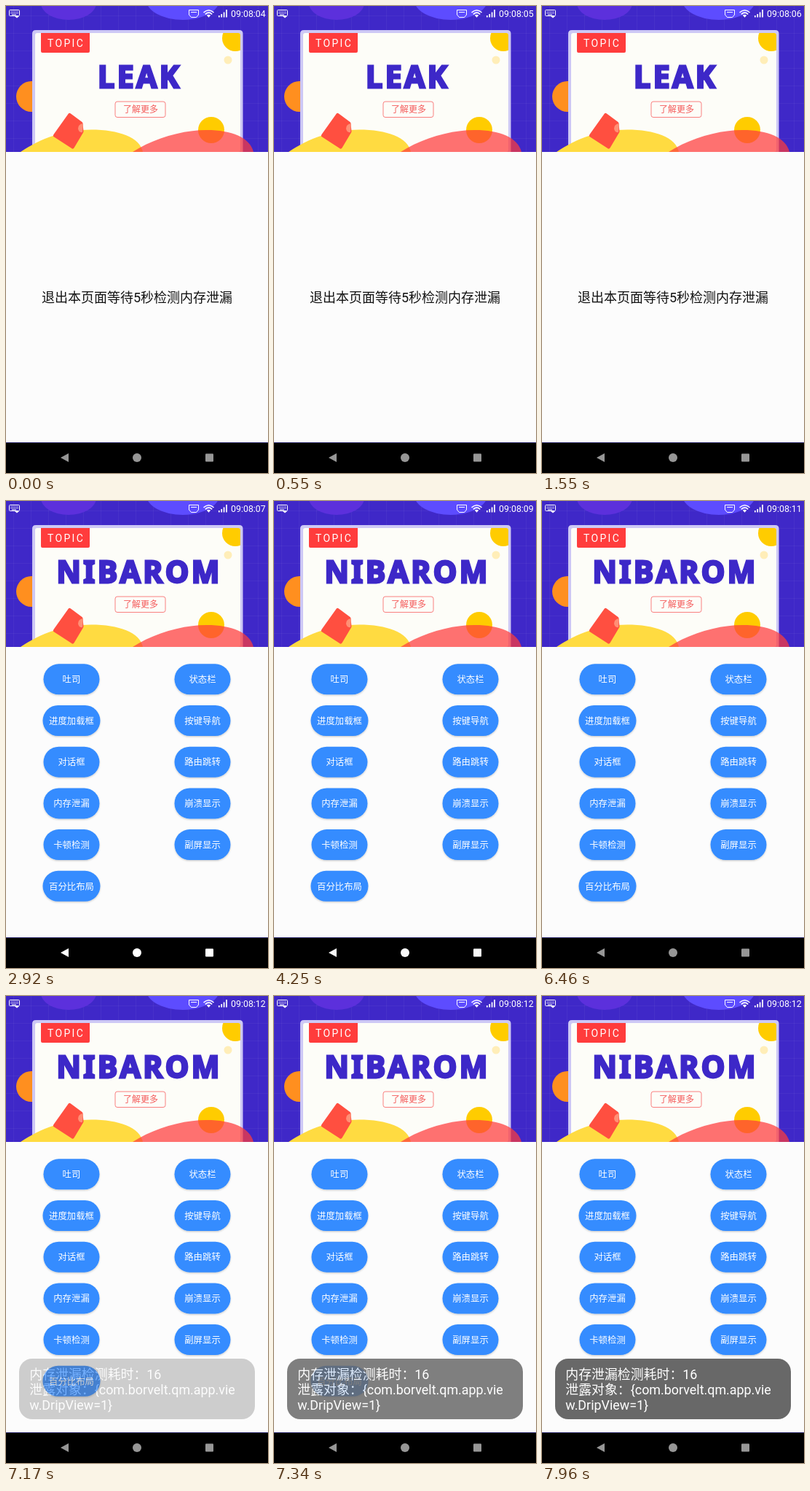
Animation of 360x640 px, one loop 8000 ms. Source, as an HTML page:

```html
<!DOCTYPE html>
<html lang="zh-CN">
<head>
<meta charset="utf-8">
<style>
  html, body { margin: 0; width: 100%; height: 100%; overflow: hidden; background: #000; }
  svg { display: block; width: 360px; height: 640px; font-family: Roboto, "Noto Sans CJK SC", "Noto Sans CJK", sans-serif; }
  .title { font: 700 41px "Noto Sans", sans-serif; letter-spacing: 3.4px; fill: #3d28c8; stroke: #3d28c8; stroke-width: 2.8; }
  .mid { text-anchor: middle; }
  .toast { font-size: 17.9px; fill: #fff; }
</style>
</head>
<body>
<svg viewBox="0 0 360 640">
  <defs>
    <pattern id="grid" x="10" y="13" width="24" height="24" patternUnits="userSpaceOnUse">
      <path d="M0 .5H24M.5 0V24" stroke="#fff" stroke-opacity=".045"/>
    </pattern>
    <clipPath id="card"><rect x="40" y="37" width="282" height="163" rx="3"/></clipPath>
    <filter id="shadow" x="-20%" y="-20%" width="140%" height="160%">
      <feDropShadow dx="0" dy="1.2" stdDeviation="1" flood-opacity=".2"/>
    </filter>
    <g id="banner">
      <path fill="#3f28c8" d="M0 0H360V200H0Z"/>
      <path fill="url(#grid)" d="M0 0H360V200H0Z"/>
      <ellipse cx="86" cy="-4" rx="38" ry="23" fill="#5c30dc"/>
      <ellipse cx="243" cy="-8" rx="50" ry="27" fill="#5d4cff"/>
      <circle cx="35" cy="124" r="21" fill="#ff8f1f"/>
      <path fill="#cdc8f5" d="M36 200V38Q36 33 41 33H320.500Q325.500 33 325.500 38V200Z"/>
      <g clip-path="url(#card)">
        <path fill="#fdfdf8" d="M40 37H322V200H40Z"/>
        <circle cx="315" cy="44" r="18" fill="#ffcc00"/>
      </g>
      <circle cx="305" cy="74" r="5.5" fill="#ffeeb8"/>
      <path fill="#ff3c3c" d="M48 37H115V62Q115 64 113 64H50Q48 64 48 62Z"/>
      <text x="57" y="56" font-size="14" letter-spacing="2.3" fill="#fff">TOPIC</text>
      <rect x="150" y="131" width="69" height="21.5" rx="3" fill="none" stroke="#f98080"/>
      <text class="mid" x="185" y="146" font-size="12" fill="#f45a5a">了解更多</text>
      <circle cx="282" cy="170" r="18" fill="#ffcc00"/>
      <path fill="#ffdb41" d="M20 200C48 181 80 169.500 117 169.500C155 169.500 184 180 188 200Z"/>
      <path fill="#ff3c3c" fill-opacity=".72" d="M174 200C202 182 240 170 276 170C310 170 335 180 340 200Z"/>
      <path fill="#ff4f40" stroke="#ff4f40" stroke-width="5" stroke-linejoin="round" d="M67.500 177.500L87.500 149.500L103 161L104 172L91.500 193Z"/>
      <path fill="#ff8f75" d="M106 161Q99 162 99 168Q100 174 105 173Z"/>
    </g>
  </defs>

  <g id="home">
    <path fill="#fcfcfc" d="M0 0H360V598H0Z"/>
    <use href="#banner"/>
    <text class="title mid" x="183.200" y="112">NIBAROM</text>
    <g id="buttons"></g>
  </g>

  <g id="leak">
    <path fill="#fcfcfc" d="M0 0H360V598H0Z"/>
    <use href="#banner"/>
    <text class="title mid" x="183.700" y="112">LEAK</text>
    <text class="mid" x="180" y="406" font-size="18" fill="#111">退出本页面等待5秒检测内存泄漏</text>
  </g>

  <g id="toast" class="toast">
    <rect x="18" y="497" width="324" height="83" rx="18" fill="#686868"/>
    <text x="32.300" y="525">内存泄漏检测耗时：16</text>
    <text x="32.300" y="546">泄露对象：{com.borvelt.qm.app.vie</text>
    <text x="32.300" y="567">w.DripView=1}</text>
  </g>

  <g fill="none" stroke="#fff">
    <rect x="4.500" y="5.500" width="14" height="8" rx="1"/>
    <path d="M6.500 8H17M6.500 10H17" stroke-dasharray="1.200 1"/>
    <path d="M8 12H14"/>
    <path d="M12 14H18L15 16.500Z" fill="#fff" stroke="none"/>
    <path d="M251.500 5.500H264.500V12L261.500 15.500H254.500L251.500 12ZM254 8.500H262"/>
    <path d="M271.500 9Q278.500 2.500 285.500 9M273.800 11.300Q278.500 7 283.200 11.300" stroke-width="1.600"/>
    <path d="M275.800 12.800Q278.500 10.500 281.200 12.800L278.500 15.800Z" fill="#fff" stroke="none"/>
    <path d="M292.800 15.500V13M296.200 15.500V11M299.600 15.500V8.500M303 15.500V5" stroke-width="1.700"/>
  </g>
  <text id="clock" x="309" y="15.300" font-size="12.400" fill="#fff"></text>

  <path d="M0 598H360V640H0Z"/>
  <path fill="#14105a" d="M0 598H360V599H0Z"/>
  <g id="nav">
    <path d="M75 619L86 613V625Z"/>
    <circle cx="180" cy="619" r="6"/>
    <rect x="274" y="613.500" width="11" height="11" rx="1"/>
  </g>
</svg>
<script>
const LOOP = 8000, CLOSE = 2100, DIM = 4200, TOAST = 7102;
const $ = id => document.getElementById(id);
const ramp = (t, start, length) => Math.min(1, Math.max(0, (t - start) / length));

const labels = ['吐司', '状态栏', '进度加载框', '按键导航', '对话框', '路由跳转',
  '内存泄漏', '崩溃显示', '卡顿检测', '副屏显示', '百分比布局'];
$('buttons').innerHTML = labels.map((label, i) => {
  const x = i % 2 ? 270 : 90, y = 244.3 + 56.7 * (i >> 1);
  const w = label.length > 4 ? 79 : 77;
  return `<rect x="${x - w / 2}" y="${y - 21}" width="${w}" height="42" rx="21" fill="#348cff" filter="url(#shadow)"/>
    <text class="mid" x="${x}" y="${y + 4.7}" font-size="12.4" fill="#fff">${label}</text>`;
}).join('');

function draw(now) {
  const t = now % LOOP;
  const second = 4 + Math.floor((t + 900) / 1000);
  $('clock').textContent = '09:08:' + String(second).padStart(2, '0');

  // The closing page accelerates down while it fades
  const slide = ramp(t, CLOSE, 250);
  $('leak').setAttribute('transform', `translate(0 ${51 * slide * slide})`);
  $('leak').setAttribute('opacity', 1 - ramp(t, CLOSE + 100, 150));

  $('toast').setAttribute('opacity', 1 - (1 - ramp(t, TOAST, 400)) ** 2);

  // Navigation lights up on touch, then dims again
  const level = t < CLOSE ? 150 : 255 - 105 * ramp(t, DIM, 750);
  $('nav').setAttribute('fill', `rgb(${level},${level},${level})`);
  requestAnimationFrame(() => draw(performance.now()));
}
draw(performance.now());
</script>
</body>
</html>
```
